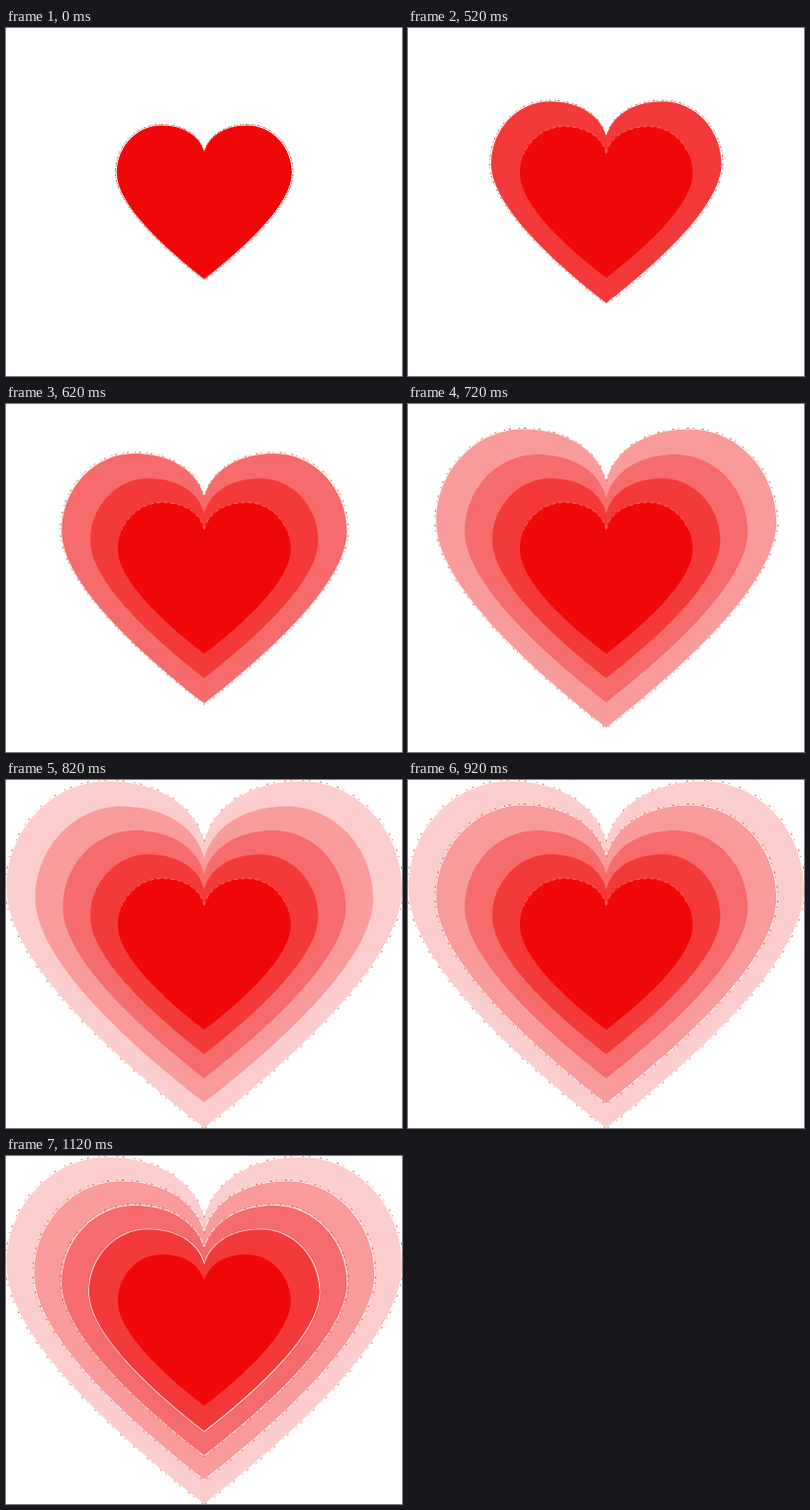
Recreate the animation shown at these times as an HTML page with a canvas. Size 400 by 352 pixels, loop 1.22 s.

```html
<!DOCTYPE html>
<html lang="en">
<head>
<meta charset="utf-8">
<title>Pulsing heart</title>
<style>
  html, body { margin: 0; width: 100%; height: 100%; overflow: hidden; background: #fff; }
  canvas { display: block; }
</style>
</head>
<body>
<canvas id="stage" width="400" height="352"></canvas>
<script>
const ctx = document.getElementById('stage').getContext('2d');
const COLORS = ['#f00808', '#f33939', '#f66b6b', '#f99b9b', '#fccdcd'];
const LOOP = 1220, REST = 520, STEP = 100;
const sizeOf = i => 87.3 + 27.8 * i;

// Heart of half-width s around the stage centre.
function heart(s) {
  const path = new Path2D();
  for (const side of [1, -1]) {
    const curve = (...p) => path.bezierCurveTo(
      ...p.map((v, k) => k % 2 ? 176 + v * s : 200.3 + side * v * s));
    path.moveTo(200.3, 176 - 0.565 * s);
    curve(0.04, -0.74, 0.22, -0.875, 0.49, -0.875);
    curve(0.77, -0.875, 1, -0.63, 1, -0.33);
    curve(1, 0.03, 0.45, 0.53, 0, 0.88);
  }
  return path;
}

function line(s, color, width, dash = []) {
  ctx.strokeStyle = color;
  ctx.lineWidth = width;
  ctx.setLineDash(dash);
  ctx.stroke(heart(s));
}

function draw(step) {
  ctx.fillStyle = '#fff';
  ctx.fillRect(0, 0, 400, 352);
  const outer = Math.min(step, 4);
  const firstOutlined = Math.min(step, 8 - step);

  for (let i = outer; i >= 0; i--) {
    const outlined = i >= firstOutlined;
    const s = sizeOf(i) + (outlined ? 1.2 : 0);
    if (outlined) {
      line(s, 'rgba(255,255,255,.85)', 1.6);
      // Rough red fringe, sparser on the larger hearts.
      if (i > 1 || step < 7) line(s + 1.3, '#c03030', 0.8, [2, 1 + i, 1, 2 + 2 * i]);
    }
    ctx.fillStyle = COLORS[i];
    ctx.fill(heart(s));
  }

  // Faint highlight left on the inner lobes while the rings grow.
  if (step > 0 && step < 7) {
    ctx.save();
    ctx.beginPath();
    ctx.rect(0, 0, 400, 127);
    ctx.clip();
    line(sizeOf(0), 'rgba(255,255,255,.45)', 0.7, [4, 3]);
    ctx.restore();
  }
}

function frame() {
  const t = performance.now() % LOOP;
  draw(t < REST ? 0 : 1 + Math.floor((t - REST) / STEP));
  requestAnimationFrame(frame);
}
frame();
</script>
</body>
</html>
```
